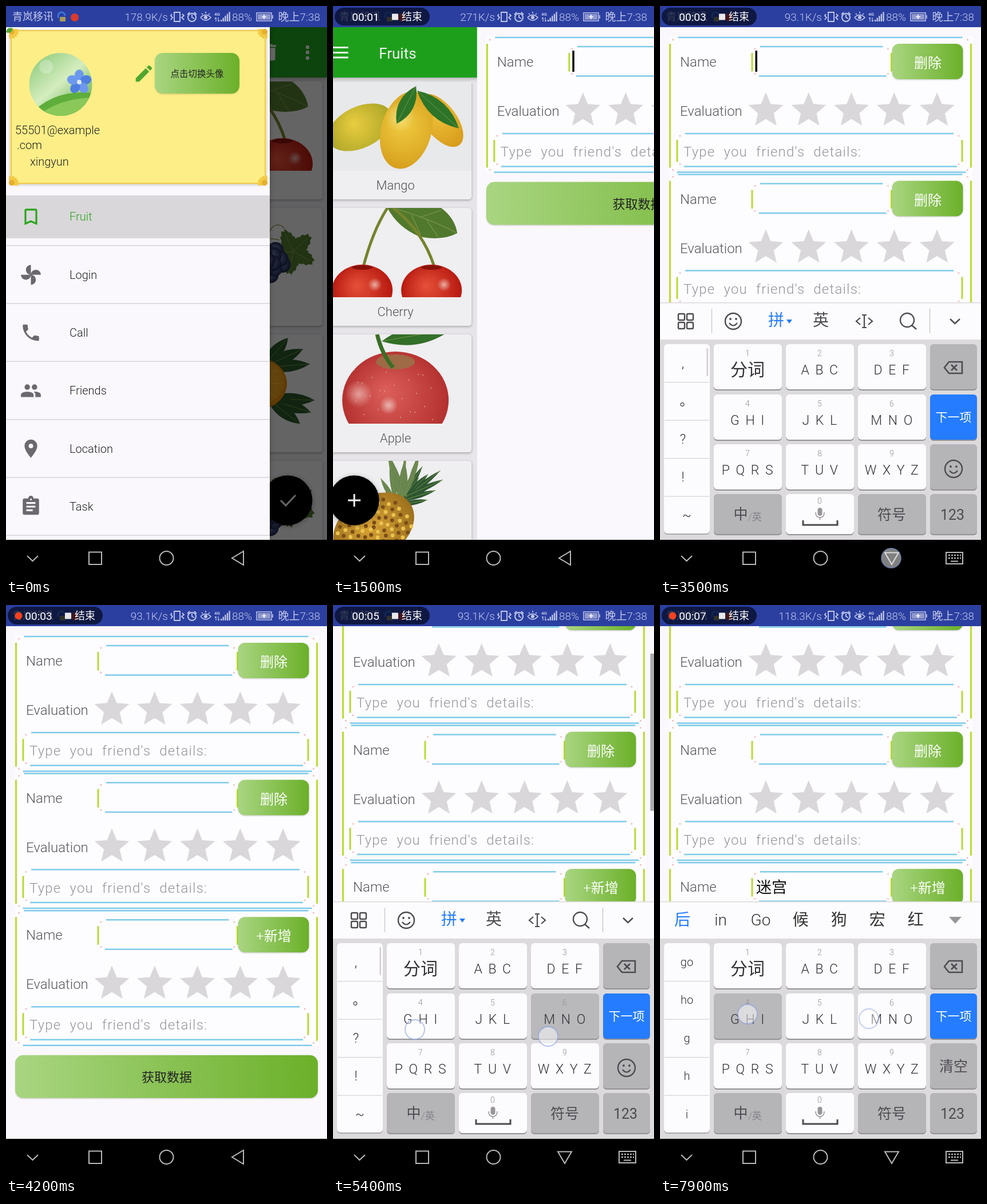
Recreate the animation shown at these times as an HTML page with a canvas. Size 561 by 998 pixels, loop 8000 ms.

```html
<!DOCTYPE html>
<html lang="zh">
<head>
<meta charset="utf-8">
<title>Fruits</title>
<style>
html, body { margin: 0; width: 100%; height: 100%; overflow: hidden; background: #000; }
canvas { display: block; width: 100vw; height: 100vh; }
</style>
</head>
<body>
<canvas id="stage" width="561" height="998"></canvas>
<script>
const c = document.getElementById('stage').getContext('2d');
const LOOP = 8000, STEP = 100, W = 561, TOP = 37, NAV = 933, KEYS_TOP = 518;
const SLIDE = 303; // length of a drawer or page transition
const FONT = 'Roboto, "Noto Sans CJK SC", "Noto Sans CJK", sans-serif';
const GREY = '#6b696d', GREEN = '#2aa51c', PAGE = '#faf8fc';

// Drawing helpers
const fill = (d, color) => { c.fillStyle = color; c.fill(new Path2D(d), 'evenodd'); };
const stroke = (d, color, w = 2) => { c.strokeStyle = color; c.lineWidth = w; c.stroke(new Path2D(d)); };
function box(x, y, w, h, r, color) {
  c.fillStyle = color;
  c.beginPath(); c.roundRect(x, y, w, h, r); c.fill();
}
function oval(x, y, rx, ry, color, rot = 0) {
  c.fillStyle = color;
  c.beginPath(); c.ellipse(x, y, rx, ry, rot, 0, 7); c.fill();
}
const dot = (x, y, r, color) => oval(x, y, r, r, color);
function ring(x, y, r, color, w = 2) {
  c.strokeStyle = color; c.lineWidth = w;
  c.beginPath(); c.arc(x, y, r, 0, 7); c.stroke();
}
function text(s, x, y, size, color, align = 'left', weight = 300) {
  c.font = `${weight} ${size}px ${FONT}`;
  c.fillStyle = color; c.textAlign = align; c.textBaseline = 'middle';
  c.fillText(s, x, y + 1);
}
function spaced(letter, word, draw) {
  c.letterSpacing = letter + 'px'; c.wordSpacing = word + 'px';
  draw();
  c.letterSpacing = c.wordSpacing = '0px';
}
function at(x, y, draw, scale = 1) {
  c.save(); c.translate(x, y); c.scale(scale, scale); draw(); c.restore();
}
const icon = (d, x, y, color, size = 38) =>
  at(x - size / 2, y - size / 2, () => fill(d, color), size / 24);
function shadow(draw, blur = 4, alpha = .3) {
  c.save();
  c.shadowColor = `rgba(0,0,0,${alpha})`; c.shadowBlur = blur; c.shadowOffsetY = 1.5;
  draw(); c.restore();
}
function greenButton(x, y, w, h, r) {
  const g = c.createLinearGradient(x, 0, x + w, 0);
  g.addColorStop(0, '#a9d581'); g.addColorStop(1, '#6bb029');
  shadow(() => box(x, y, w, h, r, g), 2, .15);
}
function ball(x, y, rx, ry, rot, light, dark) {
  const g = c.createRadialGradient(x - rx * .2, y - ry * .2, 0, x, y, Math.max(rx, ry));
  g.addColorStop(0, light); g.addColorStop(1, dark);
  oval(x, y, rx, ry, g, rot);
}
function glow(x, y, r, rgb) {
  const g = c.createRadialGradient(x, y, 0, x, y, r);
  g.addColorStop(0, `rgba(${rgb},.75)`); g.addColorStop(1, `rgba(${rgb},0)`);
  dot(x, y, r, g);
}
function leaf(x0, y0, x1, y1, w, color = '#35752a') {
  const mx = (x0 + x1) / 2, my = (y0 + y1) / 2, l = Math.hypot(x1 - x0, y1 - y0);
  const nx = (y0 - y1) / l * w, ny = (x1 - x0) / l * w;
  fill(`M${x0} ${y0}Q${mx + nx} ${my + ny} ${x1} ${y1}Q${mx - nx} ${my - ny} ${x0} ${y0}`, color);
  stroke(`M${x0} ${y0}L${x1} ${y1}`, '#7d9c48', 1);
}
function lobedLeaf(x, y, r, turn, color) {
  c.fillStyle = color; c.beginPath();
  for (let i = 0; i < 60; i++) {
    const a = i * Math.PI / 30, q = r * (.8 + .2 * Math.cos(5 * a)) * (i % 2 ? 1 : .9);
    c.lineTo(x + q * Math.cos(a + turn), y + q * Math.sin(a + turn));
  }
  c.fill();
  for (let i = 0; i < 5; i++) {
    const a = turn + i * Math.PI * .4;
    stroke(`M${x} ${y}L${x + r * .8 * Math.cos(a)} ${y + r * .8 * Math.sin(a)}`, '#8aa85a', 1);
  }
}

// Timing helpers
const clamp = v => Math.min(1, Math.max(0, v));
const span = (t, a, b) => clamp((t - a) / (b - a));
const smooth = p => p * p * (3 - 2 * p);
const easeOut = p => 1 - (1 - p) ** 2;

// Fruit pictures, drawn in a 265 x 156 area
const fruit = {
  Mango() {
    box(0, 0, 265, 156, 0, '#f4f5f8');
    ball(70, 80, 60, 36, -.45, '#f6d843', '#b5ae2a');
    ball(211, 68, 28, 54, -.65, '#fbcb3c', '#e2a31c');
    ball(151, 85, 44, 69, .27, '#fdd845', '#e3a81f');
    glow(140, 62, 26, '255,238,150');
    leaf(168, 8, 134, 74, 26, '#2f7a2b'); leaf(170, 16, 243, 82, 28, '#2f7a2b');
  },
  Cherry() {
    fill('M118 0H212Q236 18 240 44Q214 58 174 50Q136 34 118 0', '#557f2f');
    stroke('M128 0Q190 18 238 43M160 12L176 47M186 20L206 50M176 16L212 4', '#83a253', 1.2);
    stroke('M118 0Q92 40 75 106M128 0Q180 40 200 103', '#7b8a2e', 5);
    for (const x of [74, 195]) {
      ball(x, 144, 53, 45, 0, '#f2553c', '#c11a10');
      oval(x, 104, 18, 4, '#8d130c');
      glow(x + 22, 134, 12, '255,225,215');
    }
  },
  Apple() {
    leaf(108, 12, 232, -10, 32);
    ball(132, 115, 93, 85, 0, '#e8645f', '#bd3432');
    oval(132, 48, 34, 13, '#a8704a');
    stroke('M100 0Q108 34 128 58', '#3d7428', 7);
    glow(68, 104, 24, '255,200,195'); glow(120, 124, 16, '255,225,220');
    for (let i = 0; i < 26; i++) dot(60 + i * 53 % 145, 62 + i * 37 % 88, 1, '#edaaa0');
  },
  Pineapple() {
    for (let i = 0; i < 17; i++) {
      const a = -2.1 + i * 9 % 17 * .12, l = 55 + i * 7 % 5 * 8;
      const x = 134 + i % 3 * 8, y = 78 - i % 3 * 8;
      leaf(x, y, x + l * Math.cos(a), y + l * Math.sin(a), 9, i % 2 ? '#2f5a35' : '#6f8c55');
    }
    ball(94, 116, 76, 54, -.55, '#e9b13a', '#a57620');
    for (let i = 0; i < 90; i++) {
      const r = Math.sqrt(i / 90), a = i * 2.4;
      dot(94 + 66 * r * Math.cos(a), 116 + 54 * r * Math.sin(a), 3.4, i % 2 ? '#f6cd55' : '#80521a');
    }
  },
  Grape() {
    lobedLeaf(118, 35, 34, -.6, '#4f7a33'); lobedLeaf(214, 76, 42, .5, '#56802f');
    stroke('M170 52C174 18 204 30 198 42M150 62Q170 50 190 56', '#9b9b56', 1.5);
    for (let i = 42; i >= 0; i--) {
      const r = Math.sqrt(i / 42), a = i * 2.4;
      ball(134 + 64 * r * Math.cos(a), 102 + 33 * r * Math.sin(a) - 12 * r * Math.cos(a),
        14, 14, 0, '#7d8dc2', '#1c2650');
    }
  },
  Orange() {
    for (const [x, y, tips] of [[160, 58, [-1, -.55, -.1]], [90, 96, [1.5, 2, 2.5]], [168, 112, [.05, .4, .8]]])
      for (const a of tips)
        leaf(x, y, x + 88 * Math.cos(a) * .95, y + 62 * Math.sin(a), 22, '#2b5a2a');
    for (const [x, y, rx, ry] of [[100, 36, 52, 50], [149, 86, 54, 46]]) {
      oval(x, y, rx, ry, '#ee920f');
      ball(x, y - 2, rx - 5, ry - 5, 0, '#ffc13c', '#f7a31a');
      for (let i = 0; i < 9; i++) {
        const a = i * Math.PI / 4.5;
        stroke(`M${x} ${y}L${x + (rx - 9) * Math.cos(a)} ${y + (ry - 9) * Math.sin(a)}`, '#fdc04c', 1.2);
      }
      glow(x, y, 14, '255,240,200');
    }
  }
};
const columns = [['Mango', 'Cherry', 'Apple', 'Pineapple'], ['Cherry', 'Grape', 'Orange', 'Grape']];

function listPage() {
  box(0, TOP, W, NAV - TOP, 0, '#f3f1f5');
  columns.forEach((names, col) => names.forEach((name, row) => at(8 + col * 280, 132 + row * 221, () => {
    shadow(() => box(0, 0, 265, 206, 5, '#fcfbfd'));
    c.save();
    c.beginPath(); c.rect(0, 0, 265, 156); c.clip();
    fruit[name]();
    c.restore();
    text(name, 132, 182, 22, '#59575b', 'center');
  })));
  shadow(() => box(0, TOP, W, 88, 0, '#20a81e'), 6);
  stroke('M31 72.5H57.5M31 81.5H57.5M31 90H57.5', '#fff', 3);
  text('Fruits', 111, 83, 26, '#fff', 'left', 400);
  icon('M19 9h-4V3H9v6H5l7 7zM5 18v2h14v-2z', 386, 81, '#fff');
  icon('M6 19a2 2 0 0 0 2 2h8a2 2 0 0 0 2-2V7H6zM19 4h-3.5l-1-1h-5l-1 1H5v2h14z', 461, 81, '#fff');
  for (const y of [72, 81, 91]) dot(527, y, 3.2, '#fff');
  for (const x of [68, 492]) shadow(() => dot(x, 864, 43.5, '#000'), 8);
  stroke('M57 864H79M68 853V875', '#fff', 3);
  stroke('M480 864L489 873L506 855', '#fff', 3);
}

const menu = [
  ['Fruit', 'M17 3H7a2 2 0 0 0-2 2V21l7-3 7 3V5a2 2 0 0 0-2-2zm0 15l-5-2.2L7 18V5h10z'],
  ['Login', 'M12 12c0-3 2.5-5.5 5.5-5.5S23 9 23 12zc0 3-2.5 5.5-5.5 5.5S1 15 1 12zc-3 0-5.5-2.5-5.5-5.5S9 1 12 1zc3 0 5.5 2.5 5.5 5.5S15 23 12 23z'],
  ['Call', 'M6.6 10.8A15 15 0 0 0 13.2 17.4L15.4 15.2A1 1 0 0 1 16.4 15Q18 15.5 20 15.5A1 1 0 0 1 21 16.5V20A1 1 0 0 1 20 21A17 17 0 0 1 3 4A1 1 0 0 1 4 3H7.5A1 1 0 0 1 8.5 4Q8.5 6 9 7.6A1 1 0 0 1 8.8 8.6Z'],
  ['Friends', 'M5 8a3 3 0 0 1 6 0a3 3 0 0 1-6 0M13 8a3 3 0 0 1 6 0a3 3 0 0 1-6 0M1 19V16.5C1 12 15 12 15 16.5V19ZM17 19V16.5Q17 14.5 15 13Q23 13 23 16.5V19Z'],
  ['Location', 'M12 2a7 7 0 0 0-7 7c0 5.2 7 13 7 13s7-7.8 7-13a7 7 0 0 0-7-7zM9.5 9a2.5 2.5 0 0 1 5 0a2.5 2.5 0 0 1-5 0'],
  ['Task', 'M5 3H9A3 3 0 0 1 15 3H19A2 2 0 0 1 21 5V19A2 2 0 0 1 19 21H5A2 2 0 0 1 3 19V5A2 2 0 0 1 5 3ZM11 4a1 1 0 0 0 2 0a1 1 0 0 0-2 0M7 7H17V9H7ZM7 11H17V13H7ZM7 15H14V17H7Z']
];

function avatar() {
  c.save();
  c.beginPath(); c.arc(95.5, 137, 55, 0, 7); c.clip();
  const g = c.createLinearGradient(45, 90, 130, 190);
  g.addColorStop(0, '#8ecb7c'); g.addColorStop(.5, '#d5edbf'); g.addColorStop(1, '#62ad4c');
  box(40, 82, 111, 111, 0, g);
  dot(70, 106, 12, 'rgba(255,255,255,.25)');
  fill('M40 192Q82 145 151 152V193H40Z', '#5fae3c');
  fill('M55 193Q90 162 151 160V193Z', '#8ac85a');
  for (let i = 0; i < 5; i++) {
    const a = -Math.PI / 2 + i * Math.PI * .4;
    oval(128 + 12 * Math.cos(a), 133 + 12 * Math.sin(a), 10, 8, i % 2 ? '#4f7fe0' : '#6c99ee', a);
  }
  dot(128, 133, 4, '#dfe9ff');
  c.restore();
}

// Small fan of gold petals pointing into the panel
function corner(x, y, sx, sy) {
  for (let i = 0; i < 5; i++) {
    const a = i * Math.PI / 8;
    oval(x + sx * 9 * Math.cos(a), y + sy * 9 * Math.sin(a), 6, 3, '#f3ca45', Math.atan2(sy * Math.sin(a), sx * Math.cos(a)));
  }
  dot(x + sx * 2, y + sy * 2, 5, '#e5b02c');
}

function drawer(t) {
  shadow(() => box(0, TOP, 461, NAV - TOP, 0, PAGE), 8);
  shadow(() => box(7, 42, 448, 269, 3, '#fdee87'), 5, .2);
  c.strokeStyle = '#eecb52'; c.lineWidth = 2.2; c.strokeRect(9, 43, 444, 267);
  corner(8, 43, 1, 1); corner(454, 43, -1, 1); corner(8, 311, 1, -1); corner(454, 311, -1, -1);
  leaf(0, 46, 12, 39, 8, '#49a82b');
  avatar();
  text('55501@example', 16, 217, 20, '#222');
  text('.com', 19, 243, 20, '#222');
  text('xingyun', 42, 272, 20, '#222');
  icon('M3 17.2V21h3.8L17.8 9.9 14 6.2ZM20.7 7a1 1 0 0 0 0-1.4L18.4 3.3a1 1 0 0 0-1.4 0L15.1 5.1 18.9 8.9Z', 241, 118, '#4ea52f');
  greenButton(260, 82, 148, 71, 14);
  text('点击切换头像', 334, 118, 15.5, '#222', 'center', 400);
  const selected = t < 1050 ? 0 : 3, ripple = span(t, 500, 1000);
  menu.forEach(([label, d], i) => {
    const y = 368.5 + i * 101.3, on = i === selected;
    if (on) box(0, y - 37.5, 461, 75, 0, '#d9d7da');
    if (i === 3 && ripple > 0 && !on) {
      c.save();
      c.beginPath(); c.rect(0, y - 37.5, 461, 75); c.clip();
      dot(210, y, 40 + 240 * ripple, 'rgba(0,0,0,.1)');
      c.restore();
    }
    icon(d, 43.5, y, on ? GREEN : GREY);
    text(label, 111, y, 20, on ? GREEN : '#222');
    box(0, y + 49.5, 461, 1.5, 0, '#d6d4d8');
  });
}

// Friend form
function frame(x0, y0, x1, y1) {
  stroke(`M${x0 + 14} ${y0}H${x1 - 15}M${x0 + 12} ${y1}H${x1 - 9}`, '#7fcbea', 2.5);
  stroke(`M${x0} ${y0 + 11}V${y1 - 8}M${x1} ${y0 + 11}V${y1 - 8}`, '#b3dc22', 2.8);
  for (const x of [x0 + 5, x1 - 6]) for (const y of [y0 + 4, y1 - 4]) dot(x, y, 1.4, '#f7b5b5');
}
function star(x, y, r) {
  c.beginPath();
  for (let i = 0; i < 10; i++) {
    const a = -Math.PI / 2 + i * Math.PI / 5, q = i % 2 ? r * .45 : r;
    c.lineTo(x + q * Math.cos(a), y + q * Math.sin(a));
  }
  c.fillStyle = '#d9d7da'; c.fill();
}
function cell(label, value, caret) {
  box(16, 53, 530, 239, 0, '#fdfcff');
  frame(17.5, 55, 543.5, 290.5);
  frame(161, 71, 404.5, 122.5);
  frame(30, 223, 528, 280.5);
  text('Name', 35, 98, 24, '#59575b');
  text('Evaluation', 35, 184, 24, '#59575b');
  spaced(1.2, 8, () => text("Type you friend's details:", 41, 255, 24, '#969498'));
  for (let i = 0; i < 5; i++) star(185 + i * 74.8, 183, 32);
  greenButton(405.5, 66, 124, 62, 12);
  text(label, 468, 100, 24, '#fff', 'center');
  if (value) text(value, 168, 99, 27, '#111');
  if (caret) box(value ? 222 : 166.5, 78, 3.5, 37, 0, '#000');
}
function formPage(t, scroll) {
  box(0, TOP, W, NAV - TOP, 0, PAGE);
  const count = t < 2350 ? 1 : t < 3150 ? 2 : 3, pitch = 239.6;
  const focused = t < 4650 ? 0 : 2;
  const phase = t >= 4650 && t < 6300 ? 650 : 300;
  const blink = (t - phase) % 1000 < 500;
  for (let i = 0; i < count; i++) at(0, i * pitch - scroll, () =>
    cell(i < count - 1 ? '删除' : '+新增', i === 2 && t >= 6450 ? '迷宫' : '', i === focused && blink));
  const y = 68 + count * pitch - scroll;
  greenButton(16, y, 529, 75, 14);
  text('获取数据', 281, y + 39, 22, '#222', 'center', 400);
  if ((t >= 2350 && t < 3500) || (t >= 4900 && t < 6000)) {
    const view = KEYS_TOP - TOP, content = 123 + count * pitch;
    box(554.5, TOP + scroll * view / content, 6.5, view * view / content, 0, '#aaa9ac');
  }
}

// Touches: start, duration, x, y
const touches = [
  [500, 500, 210, 673], [2220, 300, 482, 100], [3000, 300, 482, 340], [3400, 250, 404, 965],
  [4480, 250, 285, 578], [5330, 250, 376, 754], [5390, 250, 143, 742], [5600, 250, 146, 736],
  [5760, 250, 378, 745], [5920, 250, 374, 742], [6080, 250, 150, 730], [6300, 250, 55, 551],
  [7250, 250, 148, 722], [7680, 300, 365, 723], [7830, 270, 153, 715]
];
const keyTouches = touches.filter(([, , x, y]) => y > 680 && y < 760 && x < 470);

// Candidates and syllables after each number of typed letters
const firstWord = [
  ['吗 你 哦 没 年 哪 女', 'm n o'], ['你 米 密 尼 泥 迷 秘', 'mi ni m n o'],
  ['密 你 名 明 民 您 迷', 'mi ni m n o'], ['密 你 名 迷 民 您 米', 'mi ni m n o'],
  ['迷宫 密 你 米 迷 名', 'mi ni m n o'], ['迷宫 密 你 米 迷 名', 'mi ni m n o']
];
const secondWord = [['个 给 好 会 还 或', 'g h i'], ['后 in Go 候 狗 宏 红', 'go ho g h i']];
function composing(t) {
  const word = t < 6700 ? firstWord : secondWord;
  if (t >= 6450 && t < 6700) return null;
  const typed = keyTouches.filter(([s]) => (s < 6700) === (t < 6700) && t >= s + 180).length;
  return word[Math.min(typed, word.length) - 1];
}

const keyX = [94, 220, 346, 472], keyY = [591, 679, 766, 853];
const letters = ['分词', 'A B C', 'D E F', 'G H I', 'J K L', 'M N O', 'P Q R S', 'T U V', 'W X Y Z'];
function key(col, row, color) {
  const x = keyX[col], y = keyY[row], w = col === 3 ? 82 : 119, h = row === 3 ? 70 : 79;
  box(x, y + 2, w, h, 6, '#929194');
  box(x, y, w, h, 6, color);
}
function smiley(x, y, r) {
  ring(x, y, r, '#4d4b50', 2.4);
  dot(x - 5, y - 4, 1.9, '#4d4b50'); dot(x + 5, y - 4, 1.9, '#4d4b50');
  stroke(`M${x - 7} ${y + 3}Q${x} ${y + 12} ${x + 7} ${y + 3}`, '#4d4b50', 2.2);
}
function toolbar() {
  const ink = '#4d4b50';
  c.strokeStyle = ink; c.lineWidth = 2.4;
  for (const x of [32, 47]) for (const y of [538, 553]) {
    c.beginPath(); c.roundRect(x, y, 11, 11, 2); c.stroke();
  }
  smiley(128, 551, 14);
  text('拼', 203, 550, 28, '#257cff', 'center', 500);
  fill('M221 548H231L226 555Z', '#257cff');
  text('英', 281, 550, 28, ink, 'center', 400);
  stroke('M350 545L343 551L350 557M364 545L371 551L364 557M353 540H361M353 562H361M357 540V562', ink, 2.2);
  ring(432, 549, 12, ink, 2.4);
  stroke('M440 558L448 565M507 547L515.5 555L524 547', ink, 2.5);
  stroke('M90.5 529V572M471.5 529V572', '#ccc', 1.5);
}
function candidates(words) {
  let x = 5.5;
  words.split(' ').forEach((word, i) => {
    c.font = `300 28px ${FONT}`;
    const w = Math.max(67, c.measureText(word).width + 38);
    text(word, x + w / 2, 551, 28, i ? '#333' : '#257cff', 'center');
    x += w;
  });
  fill('M505 545H527L516 557Z', '#97959a');
}
function keyboard(t) {
  const state = composing(t), ink = '#333136';
  box(0, KEYS_TOP, W, 65, 0, '#fcfbfe');
  box(0, KEYS_TOP, W, 1.5, 0, '#dcdadd');
  box(0, 583, W, 350, 0, '#dcdadd');
  state ? candidates(state[0]) : toolbar();

  box(7, 593, 80, 331, 6, '#aaa9ac'); box(7, 591, 80, 331, 6, '#fcfbfe');
  for (let i = 1; i < 5; i++) box(8, 590.5 + i * 66.5, 78, 1.3, 0, '#d5d3d7');
  if (state) state[1].split(' ').forEach((s, i) => text(s, 47, 624 + i * 66.5, 20, ink, 'center'));
  else {
    [',', '。', '?', '!', '~'].forEach((s, i) => text(s, i === 1 ? 46 : i === 4 ? 47 : 40, 624 + i * 66.5, 23, ink, 'center'));
    box(81.5, 598, 2.5, 49, 1, '#d0ced2');
  }

  letters.forEach((label, i) => {
    const col = i % 3, row = i / 3 | 0, x = keyX[col], y = keyY[row];
    const pressed = keyTouches.some(([s, , px, py]) => t >= s + 60 && t < s + 200 &&
      px >= x && px < x + 119 && py >= y && py < y + 79);
    key(col, row, pressed ? '#b9b8bb' : '#fcfbfe');
    text(i + 1, x + 59, y + 16, 14, '#929095', 'center');
    if (i) spaced(2.5, 0, () => text(label, x + 60, y + 45, 23, ink, 'center'));
    else text(label, x + 59, y + 45, 30, ink, 'center');
  });

  const grey = '#b5b4b7';
  key(3, 0, grey); key(3, 1, '#257cff'); key(3, 2, grey);
  key(0, 3, grey); key(1, 3, '#fcfbfe'); key(2, 3, grey); key(3, 3, grey);
  stroke('M497 632L505 622H528V642H505ZM509 627L519 637M519 627L509 637', '#4d4b50', 2.6);
  text('下一项', 513, 719, 21, '#fff', 'center', 400);
  state ? text('清空', 513, 807, 25, '#4d4b50', 'center') : smiley(513, 809, 15);
  text('中', 141, 889, 25, '#4d4b50', 'center', 400);
  text('/英', 154, 893, 17, '#858388');
  text('符号', 405, 890, 25, '#4d4b50', 'center', 400);
  text('123', 511, 890, 25, '#4d4b50', 'center', 400);
  text('0', 279, 865, 14, '#929095', 'center');
  box(275.5, 877, 8, 14, 4, '#98969a');
  stroke('M272 885Q272 894 279.5 894Q287 894 287 885M279.5 894V898', '#98969a', 1.6);
  stroke('M250 899V907H310V899', '#4d4b50', 3);
}

function statusBar(t) {
  const ink = '#c3c9ea';
  box(0, 0, W, TOP, 0, '#2b3fa1');
  text('青岚移讯', 11, 19, 18, ink);
  stroke('M91 21V17A6 6 0 0 1 103 17', '#3f7be0', 2.5);
  box(94, 19, 10, 8, 1, '#a99a58');
  dot(120, 20, 7, '#d93a2b');
  const speed = t < 500 ? '178.9' : t < 3500 ? '271' : t < 6500 ? '93.1' : '118.3';
  text(speed + 'K/s', 283, 19, 19, ink, 'right');
  stroke('M294 11H304V27H294ZM290 14L288 17L291 20L288 24M308 14L311 17L307 20L311 24', ink, 1.8);
  ring(325, 20, 7, ink, 2);
  stroke('M325 15V20L329 22M317 15L321 11M333 15L329 11', ink, 1.8);
  stroke('M340 20Q349 11 358 20Q349 30 340 20M342 13L344 15M349 10V13M356 13L354 15', ink, 1.7);
  dot(349, 20, 3, ink);
  text('4G', 364, 14, 8, ink, 'left', 700);
  stroke('M367 20V27M365 22L367 20M371 20V27M373 25L371 27', ink, 1.2);
  for (let i = 0; i < 5; i++) box(375 + i * 3.6, 24 - i * 3.4, 2.3, 3 + i * 3.4, 0, ink);
  text('88%', 395, 19, 19, ink);
  stroke('M438 12H464V26H438ZM466 16V22', ink, 1.5);
  box(440, 14, 22, 10, 0, '#8f98cf');
  stroke('M447 19H455M451 15V23', '#fff', 1.6);
  text('晚上7:38', 549, 19, 19, ink, 'right');
  if (t < 100) return;
  box(3, 3, 166, 31, 15.5, 'rgba(4,10,30,.72)');
  if (t < 500 || (t - 300) % 1000 >= 550) dot(22, 19, 6.5, '#f5411f');
  text('00:0' + Math.max(0, Math.floor((t - 300) / 1000)), 57, 19, 19, '#fff', 'center', 400);
  box(103, 13.5, 11, 11, 1, '#e8e8ec');
  text('结束', 120, 19, 18, '#fff', 'left', 400);
}
function navBar(typing) {
  const ink = '#b9b9b9';
  box(0, NAV, W, 65, 0, '#000');
  stroke('M37 961L46.5 970L56 961M145 954.5H167V976H145Z', ink);
  ring(280.5, 965, 12, ink);
  stroke(typing ? 'M393 955.5H417L405 976Z' : 'M415 953V977L395 965Z', ink);
  if (!typing) return;
  stroke('M500 955H529V975H500Z', ink);
  c.setLineDash([3, 2]);
  stroke('M504 960H526M504 965H526', ink, 2.5);
  c.setLineDash([]);
  stroke('M508 970.5H521', ink);
}
function drawTouches(t) {
  for (const [start, length, x, y] of touches) {
    if (t < start || t >= start + length) continue;
    c.globalAlpha = clamp((start + length - t) / 100);
    dot(x, y, 17, 'rgba(255,255,255,.5)');
    ring(x, y, 17, 'rgba(130,155,225,.6)', 1.8);
    c.globalAlpha = 1;
  }
}

function draw(t) {
  const closed = smooth(span(t, 1100, 1100 + SLIDE)), enter = easeOut(span(t, 1400, 1400 + SLIDE));
  const again = easeOut(span(t, 4650, 4950));
  const raised = easeOut(span(t, 1850, 2100)) - smooth(span(t, 3500, 3750)) + again;
  if (enter < 1) {
    at(-56 * enter, 0, () => {
      listPage();
      const dim = .6 * Math.min(1, 1.3 * (1 - closed)) + .09 * enter;
      box(0, TOP, W + 56, NAV - TOP, 0, `rgba(0,0,0,${dim})`);
    });
    if (closed < 1) at(-461 * closed, 0, () => drawer(t));
  }
  if (enter > 0) at(W * (1 - enter), 0, () => formPage(t, 84 * again));
  if (raised > 0) at(0, (NAV - KEYS_TOP) * (1 - raised), () => keyboard(t));
  statusBar(t);
  navBar(raised > .5);
  drawTouches(t);
}

function tick(now) {
  draw(Math.floor(now % LOOP / STEP) * STEP);
  requestAnimationFrame(tick);
}
requestAnimationFrame(tick);
</script>
</body>
</html>
```
